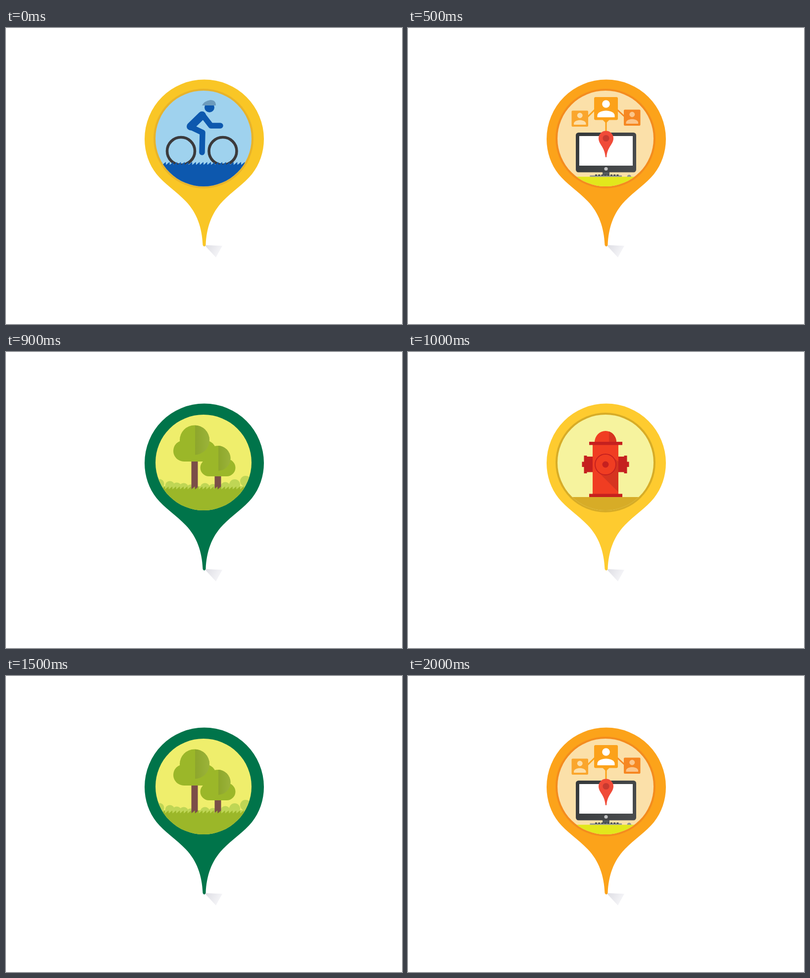
Recreate the animation shown at these times as an HTML page with a canvas. Size 800 by 600 pixels, loop 2100 ms.

```html
<!DOCTYPE html>
<html lang="en">
<head>
<meta charset="utf-8">
<title>Map pins</title>
<style>
html, body { margin: 0; width: 100%; height: 100%; overflow: hidden; background: #fff; }
canvas { display: block; }
</style>
</head>
<body>
<canvas id="stage" width="800" height="600"></canvas>
<script>
const ctx = document.getElementById('stage').getContext('2d');
const STEP = 100;

// ---------- helpers ----------
function shape(d, color) {
  ctx.fillStyle = color;
  ctx.fill(new Path2D(d));
}
function line(d, color, width) {
  ctx.strokeStyle = color;
  ctx.lineWidth = width;
  ctx.stroke(new Path2D(d));
}
function disc(x, y, r, color) {
  ctx.fillStyle = color;
  ctx.beginPath();
  ctx.arc(x, y, r, 0, Math.PI * 2);
  ctx.fill();
}
function ring(x, y, r, color, width) {
  ctx.strokeStyle = color;
  ctx.lineWidth = width;
  ctx.beginPath();
  ctx.arc(x, y, r, 0, Math.PI * 2);
  ctx.stroke();
}
function box(x1, y1, x2, y2, color, radius = 0) {
  ctx.fillStyle = color;
  ctx.beginPath();
  ctx.roundRect(x1, y1, x2 - x1, y2 - y1, radius);
  ctx.fill();
}
function fade(x1, y1, x2, y2, from, to) {
  const g = ctx.createLinearGradient(x1, y1, x2, y2);
  g.addColorStop(0, from);
  g.addColorStop(1, to);
  return g;
}
function mirror(axis, draw) {
  draw();
  ctx.save();
  ctx.translate(axis * 2, 0);
  ctx.scale(-1, 1);
  draw();
  ctx.restore();
}
// Ground with a toothed edge; lean 0..1 places the tip inside each tooth.
function turf(x, y, slope, pitch, height, lean, color) {
  ctx.fillStyle = color;
  ctx.beginPath();
  ctx.moveTo(x, 340);
  for (let i = x; i < 505; i += pitch) {
    const base = y + (i - x) * slope;
    ctx.lineTo(i, base);
    ctx.lineTo(i + pitch * lean, base + pitch * lean * slope - height);
  }
  ctx.lineTo(505, 340);
  ctx.fill();
}

// ---------- scenes ----------
function cyclist() {
  const blue = '#0d58ae';
  ring(353.5, 249.5, 28, '#3b3a3c', 5.6);
  ring(438, 249.5, 28, '#3b3a3c', 5.6);
  line('M396 177 L373 199.5', blue, 16);
  line('M397 176 L414 198 H433', blue, 11.5);
  line('M373 200.5 L397 212 L396 252', blue, 11.5);
  disc(411, 161, 10, blue);
  shape('M396 157 Q400 148 413 146 Q424 146 424 157 Z', '#6d9bbb');
  turf(308, 277.5, 0, 7.6, 6, .95, blue);
}

function hydrant() {
  const red = '#f03d22', dark = '#c5201f', shade = '#d63420';
  box(298, 294, 500, 330, '#d7ac27');
  mirror(399, () => {
    box(356, 212, 374, 243.5, dark);
    box(355.5, 210, 361.5, 246, dark);
    box(351.5, 222.5, 357, 233, dark);
  });
  box(373, 186, 425, 290, red);
  shape('M384 243 L425 284 V222 L414 214 Z', shade);
  shape('M377 183 A22 23 0 0 1 421 183 Z', red);
  shape('M406 183 V161 A22 23 0 0 1 421 183 Z', shade);
  box(366, 182, 433, 188.5, dark);
  box(366, 287.5, 433, 294, dark);
  disc(399, 228, 21, red);
  ring(399, 228, 21, dark, 2);
  disc(399, 228, 6.5, dark);
}

function hiker() {
  const red = '#c8201f';
  disc(407.5, 163.5, 11.5, red);
  line('M400 183 L374 195 L368 219', red, 10.5);
  line('M402 183 L418 201 L438 205', red, 10.5);
  shape('M390 184 Q400 172 409 184 L405 200 L391 227 L376 228 L386 197 Z', red);
  shape('M376 224 H391 L389.5 259 L369 291 L357 288 L374.5 255 Z', red);
  shape('M382 230 L392 223 L413.5 242 Q416 245 416 249 L417 280 H404 L402 251 Z', red);
  shape('M435.5 180 H441.5 L432 271 H430 Z', red);
  turf(324, 298, -.253, 8.4, 6, .5, '#aecd2c');
}

function tree(x, top, r, side, low, base) {
  const green = '#9bb729', cy = base - low;
  box(x - 6.5, base, x + 6.5, 282, '#7b4e48');
  disc(x, top + r, r, green);
  disc(x - side, cy, low, green);
  disc(x + side, cy, low, green);
  box(x - side, cy - 6, x + side, base, green);
  ctx.save();
  ctx.beginPath();
  ctx.rect(x + 1, top, r + 2, base - top);
  ctx.clip();
  disc(x, top + r, r, fade(x, 0, x + r, 0, '#8da62b', '#9bb33a'));
  ctx.restore();
}

function park() {
  const bush = '#bfd655';
  box(298, 272, 500, 290, bush);
  const tops = [[310, 267], [331, 271], [345, 274], [359, 275], [373, 278], [402, 275],
    [418, 277], [443, 273], [462, 269], [484, 262]];
  for (const [x, y] of tops) disc(x, y, x > 450 ? 11 : 9.5, bush);
  tree(381, 148.5, 30, 21.5, 21.5, 222);
  tree(428, 190, 25.5, 18, 17.5, 252);
  turf(306, 278.5, 0, 7.6, 6, .95, '#9bb729');
}

function bag() {
  ctx.fillStyle = '#fff';
  ctx.beginPath();
  ctx.moveTo(351.5, 278.5);
  for (let i = 0; i < 20; i++) {
    ctx.lineTo(351.5 + i * 4.7, 176.5);
    ctx.lineTo(353.85 + i * 4.7, 179);
  }
  ctx.lineTo(445.5, 176.5);
  ctx.lineTo(445.5, 278.5);
  ctx.fill();
  mirror(397.5, () => disc(370, 194.5, 3.4, '#5d5172'));
  ctx.lineCap = 'butt';
  line('M370 195 V184 A27.5 27.5 0 0 1 425 184 V195',
    fade(0, 154, 0, 196, '#b9b6c2', '#b3bccb'), 4.4);
  ctx.lineCap = 'round';
}

function bus() {
  const red = '#f15a30', amber = '#fdb12c';
  box(298, 277, 500, 330, '#5a5a5a');
  box(395, 277, 403, 299, '#fff');
  box(395, 314, 403, 330, '#fff');
  mirror(399, () => box(347.5, 258, 370, 277, '#3e3e44', 6));
  shape('M344.5 251 V168 Q344.5 152 360 150 Q399 142 438 150 Q453.5 152 453.5 168 V251 Z', red);
  box(344.5, 249.5, 453.5, 262.5, '#757877');
  mirror(399.2, () => {
    shape('M352.5 214 V181 Q353 165 364 163 L397 160 V214 Z', '#fff');
    disc(354.5, 232, 5, amber);
  });
  box(389, 151.5, 409, 156.5, amber, 2.5);
  box(364, 224, 434, 245, '#d24c2b', 7);
  box(364, 231, 434, 232, red);
  box(364, 237, 434, 238, red);
}

function card(x, y, w, h, color, ink) {
  const s = w / 48, cx = x + w / 2;
  box(x, y, x + w, y + h, color, 3 * s);
  disc(cx, y + 14 * s, 7.8 * s, ink);
  ctx.save();
  ctx.translate(cx, y + 41 * s);
  ctx.scale(s, s);
  shape('M-17.5 0 V-4 C-17 -10 -8 -13.5 0 -13.5 S17 -10 17.5 -4 V0 Z', ink);
  ctx.restore();
}

function desktop() {
  const orange = '#fca21a';
  box(298, 301.5, 500, 330, '#e2e71c');
  line('M377 166 L362 181', orange, 3);
  line('M423 166 L438 180', '#f68722', 3);
  box(393, 291, 407, 300, '#565a5e');
  box(339, 212, 461, 292.5, fade(339, 212, 461, 292, '#34383a', '#4b4d4f'), 5.5);
  box(346, 219, 454, 279, '#fff');
  disc(400, 285.5, 3.6, '#c3c4c5');
  box(367.5, 298.8, 432, 301.5, '#8b9195');
  for (let x = 378; x < 424; x += 6.2) box(x, 297, x + 4, 299.5, '#3e4245');
  shape('M442.5 301.5 A4.2 4 0 0 1 451 301.5 Z', '#8b9195');
  line('M400 186 V212', orange, 3);
  shape('M393 186 H407 L400 193 Z', orange);
  card(376, 140, 48, 46.5, orange, '#fff');
  card(330.5, 167.5, 33.5, 32.5, '#faa62d', '#fddfa9');
  card(436, 165.5, 33.5, 32.5, '#f68722', '#fbc58a');
  shape('M385 223.5 A15 15 0 0 1 415 223.5 C415 236 403 240 401.2 261 ' +
    'Q400 263.5 398.8 261 C397 240 385 236 385 223.5 Z', '#f04b38');
  disc(400, 223.5, 6.6, '#c73a30');
}

// pin colour, rim colour, backdrop, scene
const icons = {
  A: ['#f9c626', '#e7b32b', '#9fd2ee', cyclist],
  B: ['#fecb2f', '#d7ac27', '#f6f39e', hydrant],
  C: ['#f68b1f', '#e6811f', '#f1f092', hiker],
  D: ['#00744a', '#00744a', '#efee6c', park],
  E: ['#f4cb39', '#dfba3c', '#a06bac', bag],
  F: ['#fdb62f', '#ee8a2a', '#efee6c', bus],
  G: ['#fca31a', '#f48c1e', '#fbe0a9', desktop]
};
const order = 'ADFBEGACFDBGECADBFECG';

const PIN = 'M280 225 A120.5 120.5 0 0 1 521 225 C521 252 512 277 497 296 ' +
  'C482 315 456 332 438 351 C415 375 405 405 403.5 440 Q400.5 446 397.5 440 ' +
  'C396 405 386 375 363 351 C345 332 319 315 304 296 C289 277 280 252 280 225 Z';

function drawIcon([pin, rim, back, scene]) {
  ctx.fillStyle = '#fff';
  ctx.fillRect(0, 0, 800, 600);
  ctx.lineCap = ctx.lineJoin = 'round';
  shape('M401 440 L437 441.5 L424 465 Z', fade(401, 440, 432, 456, '#dcdce2', '#f5f5f8'));
  shape(PIN, pin);
  disc(399, 224, 101, rim);
  ctx.save();
  ctx.beginPath();
  ctx.arc(399, 224, 97, 0, Math.PI * 2);
  ctx.clip();
  ctx.fillStyle = back;
  ctx.fillRect(298, 120, 204, 210);
  scene();
  ctx.restore();
}

const start = performance.now();
let shown = '';
function tick() {
  const step = Math.floor((performance.now() - start) / STEP) % order.length;
  const key = order[step];
  if (key !== shown) drawIcon(icons[shown = key]);
  requestAnimationFrame(tick);
}
tick();
</script>
</body>
</html>
```
